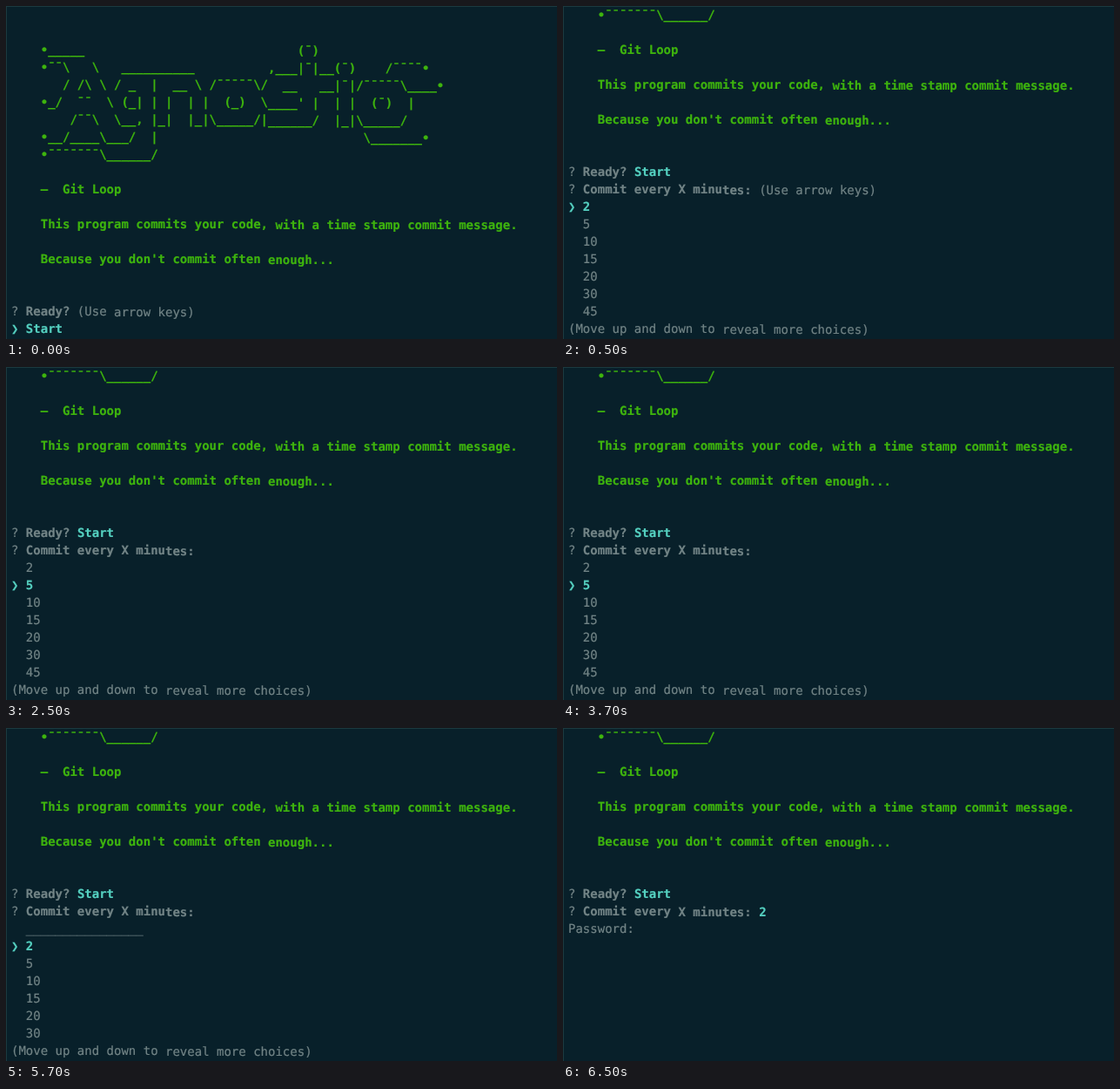
An HTML page for the animation above (8 s loop, 633 by 382 pixels).

```html
<!DOCTYPE html>
<html lang="en">
<head>
<meta charset="utf-8">
<title>Terminal prompt</title>
<style>
  html, body { margin: 0; width: 100%; height: 100%; overflow: hidden; background: #08202a; }
  .term {
    position: relative; width: 633px; height: 382px; overflow: hidden;
    color: #728486; background: #08202a;
    font: 14px/20px "DejaVu Sans Mono", "Liberation Mono", monospace;
    text-rendering: geometricPrecision; font-variant-ligatures: none;
    -webkit-text-stroke: .2px;
  }
  .term::after {
    content: ""; position: absolute; inset: 0;
    border: solid #1b3a40; border-width: 1px 0 0 1px;
  }
  /* the tiny turn keeps the half-pixel baseline from being rounded */
  pre {
    position: absolute; left: 6px; top: 181px; margin: 0; font: inherit;
    transform: translateY(.5px) rotate(.001deg);
  }
  b, i { font-weight: 700; }
  i { font-style: normal; color: #55d0c0; }
  i.cur::before { content: "❯"; display: inline-block; width: 2ch; }

  .head { top: 1px; color: #3eb40e; font-weight: 700; animation: scroll 8s step-end infinite; }
  .ready { top: 341px; }
  .ready, .ask { visibility: hidden; animation: 8s step-end infinite; }
  .ready { animation-name: ready; }
  .two { animation-name: two; }
  .five { animation-name: five; }
  .wrap { animation-name: wrap; }
  .done { animation-name: done; }

  @keyframes scroll { 0% { top: 1px } 6.25%, 100% { top: -159px } }
  @keyframes ready { 0% { visibility: visible } 6.25%, 100% { visibility: hidden } }
  @keyframes two { 0% { visibility: hidden } 6.25% { visibility: visible } 31.25%, 100% { visibility: hidden } }
  @keyframes five { 0% { visibility: hidden } 31.25% { visibility: visible } 56.25%, 100% { visibility: hidden } }
  @keyframes wrap { 0% { visibility: hidden } 56.25% { visibility: visible } 81.25%, 100% { visibility: hidden } }
  @keyframes done { 0% { visibility: hidden } 81.25%, 100% { visibility: visible } }
</style>
</head>
<body>
<div class="term">
<pre class="head">


    •_____                             (¯)
    •¯¯\   \   __________          ,___|¯|__(¯)    /¯¯¯¯•
       / /\ \ / _  |  __ \ /¯¯¯¯¯\/  __   __|¯|/¯¯¯¯¯\____•
    •_/  ¯¯  \ (_| | |  | |  (_)  \____' |  | |  (¯)  |
        /¯¯\  \__, |_|  |_|\_____/|______/  |_|\_____/
    •__/____\___/  |                            \_______•
    •¯¯¯¯¯¯¯\______/

    –  Git Loop

    This program commits your code, with a time stamp commit message.

    Because you don't commit often enough...
</pre>
<pre class="ready">? <b>Ready?</b> (Use arrow keys)
<i class="cur">Start</i></pre>
<pre class="ask two">? <b>Ready?</b> <i>Start</i>
? <b>Commit every X minutes:</b> (Use arrow keys)
<i class="cur">2</i>
  5
  10
  15
  20
  30
  45
(Move up and down to reveal more choices)</pre>
<pre class="ask five">? <b>Ready?</b> <i>Start</i>
? <b>Commit every X minutes:</b>
  2
<i class="cur">5</i>
  10
  15
  20
  30
  45
(Move up and down to reveal more choices)</pre>
<pre class="ask wrap">? <b>Ready?</b> <i>Start</i>
? <b>Commit every X minutes:</b>
  ________________
<i class="cur">2</i>
  5
  10
  15
  20
  30
(Move up and down to reveal more choices)</pre>
<pre class="ask done">? <b>Ready?</b> <i>Start</i>
? <b>Commit every X minutes:</b> <i>2</i>
Password:</pre>
</div>
</body>
</html>
```
